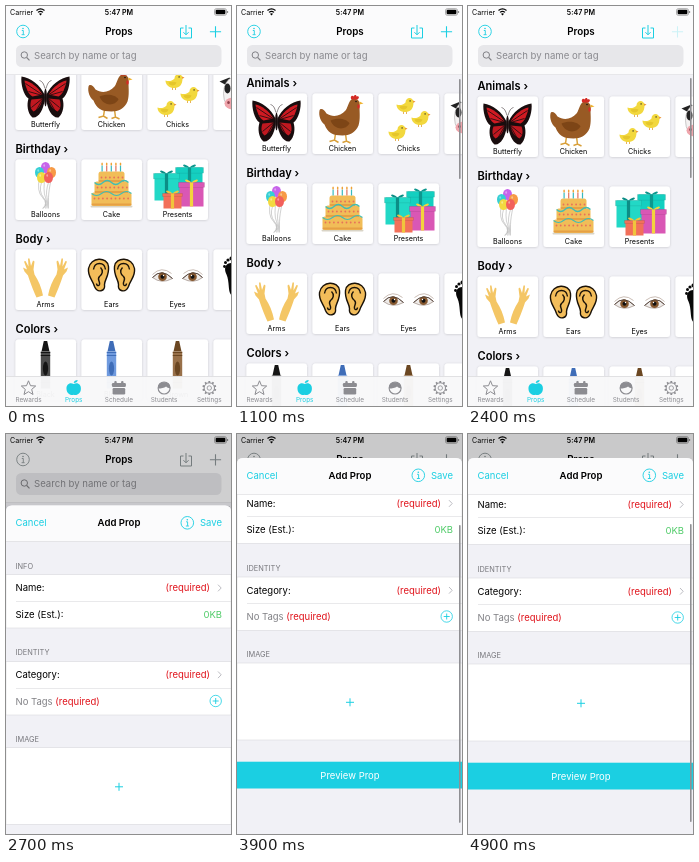
Animation, 225 px wide and 400 px high, one loop 5 s. Source, as an HTML page:

```html
<!DOCTYPE html>
<html lang="en">
<head>
<meta charset="utf-8">
<title>Props</title>
<style>
html, body { margin: 0; width: 100%; height: 100%; overflow: hidden; background: #f1f1f6; }
svg { display: block; width: 100%; height: 100%; }
text { font-family: Inter, Roboto, sans-serif; }
</style>
</head>
<body>
<svg id="stage" viewBox="0 0 225 400"></svg>
<script>
const TEAL = '#1bcfe2', RED = '#e0141c', GRAY = '#8c8c91';

const text = (x, y, size, str, more = '') =>
  `<text x="${x}" y="${y + size * 0.36}" font-size="${size}" ${more}>${str}</text>`;
const mid = (x, y, size, str, more = '') => text(x, y, size, str, 'text-anchor="middle" ' + more);
const rect = (x, y, w, h, fill, more = '') =>
  `<rect x="${x}" y="${y}" width="${w}" height="${h}" fill="${fill}" ${more}/>`;
const oval = (x, y, rx, ry, fill, more = '') =>
  `<ellipse cx="${x}" cy="${y}" rx="${rx}" ry="${ry}" fill="${fill}" ${more}/>`;
const shape = (d, fill, more = '') => `<path d="${d}" fill="${fill}" ${more}/>`;
const line = (d, color, width = 1, more = '') =>
  `<path d="${d}" fill="none" stroke="${color}" stroke-width="${width}" ${more}/>`;
const at = (x, y, art) => `<g transform="translate(${x} ${y})">${art}</g>`;
const flip = art => `<g transform="translate(60 0) scale(-1 1)">${art}</g>`;
const plus = (r, w = 1) => line(`M${-r} 0H${r}M0 ${-r}V${r}`, 'currentColor', w);
const info = oval(0, 0, 6.3, 6.3, 'none', 'stroke="currentColor" stroke-width=".9"') +
  line('M-1.2 -1H.3V3M-1.4 3.2H1.6', 'currentColor', .9) + oval(0, -3, .8, .8, 'currentColor');

// Card pictures, in a 60 x 60 box
function butterfly() {
  const wing = shape('M29 25C25 16 15 8 6 7C5 14 8 26 13 29C11 35 12 44 17 48C23 49 28 40 29 31Z', '#190d0e') +
    shape('M27 25C22 17 15 12 9 11C10 18 13 25 17 27Z', '#cf1a22') +
    shape('M27 29L16 30C14 35 15 40 18 42C23 40 26 35 27 29Z', '#c01820') +
    line('M28 26L10 14M27 26L13 22M27 29L16 38M27 30L20 42', '#190d0e', .8) + line('M29.5 19C28 14 27 12 24 11', '#190d0e', .5);
  return wing + flip(wing) + oval(30, 28, 1.4, 9, '#190d0e');
}
function chicken() {
  return line('M23 40L22 47M33 40L34 48M17 48L22 46.5L26 49M30 49L34 47.5L38 49.5', '#d9a03a', 1.5) +
    shape('M7 17C8 14 12 16 14 20C20 24 28 23 33 17C36 13 36 6 41 5C46 5 48 9 47 13C47 18 48 26 46 32C43 39 37 42 30 42C20 42 15 39 12 31C8 28 6 22 7 17Z', '#985a24') +
    shape('M18 27C25 24 34 25 37 30C33 37 22 37 18 27Z', '#7d4516') +
    shape('M39 6C37 3 40 1 41 3C42 1 44 1 44 3C47 2 47 5 45 6Z', '#d42a24') +
    shape('M47 8L51 10L47 11Z', '#efb22f') + oval(46, 13, 1.2, 2.2, '#d42a24') + oval(43.5, 8, .8, .8, '#111');
}
function chicks() {
  const chick = line('M-2 5V8.5M1 5V8.5', '#e0a030', .8) +
    shape('M-9 -1C-6 0 -3 0 0 -3C0 -9 8 -9 8 -3C8 3 5 7 -1 6.5C-6 6 -9 3 -9 -1Z', '#f2d83e') +
    shape('M-6 1C-3 0 0 0 2 1C1 5 -5 5 -6 1Z', '#e5c62c') + shape('M7.6 -5L10 -3.7L7.6 -2.7Z', '#ec8a20') + oval(4.6, -4.6, .7, .7, '#222');
  return at(27, 12, chick) + at(42, 25, chick) + at(19, 39, chick);
}
function cow() {
  return shape('M6 12L16 8L20 14L17 18Z', '#222') + oval(20, 24, 10, 16, '#f4f1f1', 'stroke="#999" stroke-width=".5"') +
    oval(14, 19, 3, 5, '#222') + oval(20, 34, 9, 6, '#efa5ac') + oval(15, 33, 1.3, 1.6, '#8f3f4a');
}
function balloons() {
  const list = [[30, 8, '#c763ea'], [24, 13, '#35cfd4'], [36, 13, '#f79a45'], [26, 18, '#f2d940'], [33, 18, '#f2605c']];
  return list.map(([x, y]) => line(`M${x} ${y + 5}Q${x - 3} 32 ${(x + 30) / 2} 38T${(x + 30) / 2} 49`, '#888', .4)).join('') +
    list.map(([x, y, c]) => oval(x, y, 4.5, 5.6, c) + oval(x - 1.3, y - 2, .9, 1.3, '#fff', 'opacity=".4"')).join('');
}
function cake() {
  let s = rect(9, 46, 42, 2, '#d9d4c6', 'rx="1"');
  const tiers = [[10, 33, 40, 13.5], [13, 22, 34, 12], [17, 12, 26, 11]];
  for (const [x, y, w, h] of tiers) {
    s += rect(x, y, w, h, '#f1bd58', 'rx="2.5"') + rect(x, y + h - 2.5, w, 2, '#e6a044', 'rx="1"');
    for (let i = x + 3; i < x + w - 1; i += 4.2) s += oval(i, y + 6, .9, .9, '#e8705a');
  }
  for (let i = 0; i < 5; i++) s += rect(20 + i * 4.6, 6, 1.2, 6, i % 2 ? '#e0705e' : '#37b9bd') + oval(20.6 + i * 4.6, 4.5, .8, 1.5, '#f0a032');
  return s + line('M13 23Q17.2 27 21.5 23T30 23T38.5 23T47 23M10 34Q15 38 20 34T30 34T40 34T50 34', '#43bdb2', 1.2);
}
function gift(x, y, w, h, box, band) {
  const c = x + w / 2;
  return rect(x, y, w, h, box) + rect(x - 1, y, w + 2, h * .2, box, 'stroke="#0002" stroke-width=".6"') + rect(c - 1.6, y, 3.2, h, band) +
    shape(`M${c} ${y}C${c - 9} ${y + 1} ${c - 8} ${y - 7} ${c} ${y}C${c + 8} ${y - 7} ${c + 9} ${y + 1} ${c} ${y}Z`, band);
}
const presents = () => gift(29, 8, 26, 28, '#14cfc0', '#0d978e') + gift(7, 14, 24, 27, '#22d8c6', '#0c8e86') +
  gift(32, 23, 24, 24, '#d957b5', '#f3d43d') + gift(16, 34, 18, 15, '#f2705a', '#f0c53c');
function arms() {
  const arm = shape('M21 48C17 39 14 31 12.5 26L9 22L7.5 18L11.5 20L8.5 12L10 11.5L13 17L12.5 9L14 9L15.5 16.5L17.5 11L19 12L18 20L19 25C23 31 26 38 27.5 46Z', '#f4c665');
  return arm + flip(arm);
}
function ears() {
  const ear = shape('M27 17C26 7 9 7 7 19C6 27 11 30 13 37C16 44 24 42 23 35C23 30 28 26 27 17Z', '#f3bd5a', 'stroke="#1a1208" stroke-width="1.4"') +
    line('M24 20C23 12 13 12 12 20M19 18C22 21 21 25 18 27C15 30 19 32 18 35C17 37 15 36 15 34', '#1a1208', 1.4);
  return ear + flip(ear);
}
function eyes() {
  const eye = shape('M5 28Q14 18 25 29Q14 35 5 28Z', '#eeebe9', 'stroke="#8d7a70" stroke-width=".6"') +
    oval(15, 27.2, 4.3, 4.3, '#86582f') + oval(15, 27.2, 2, 2, '#111') + oval(16, 26, .7, .7, '#fff') +
    line('M5 28Q14 18 25 29', '#4b3a31', .9) + line('M5 25Q14 16 24 24', '#a79084', .6);
  return eye + flip(eye);
}
const foot = () => shape('M13 25C9 17 14 12 21 14V47C13 46 17 34 13 25Z', '#080808') +
  [[11, 17, 1.4], [12, 13, 1.5], [14.5, 10.5, 1.6], [18, 9, 2]].map(([x, y, r]) => oval(x, y, r, r, '#080808')).join('');
const crayon = (dark, light) => shape('M28.3 1.5H31.7L34 12H26Z', dark) + rect(25.3, 12, 9.4, 37, light) +
  line('M25.3 13H34.7M25.3 16H34.7M25.3 43H34.7', dark, 1.2) + oval(30, 29, 2.6, 7, dark);

const sections = [
  ['Animals', [['Butterfly', butterfly()], ['Chicken', chicken()], ['Chicks', chicks()], ['Cow', cow()]]],
  ['Birthday', [['Balloons', balloons()], ['Cake', cake()], ['Presents', presents()]]],
  ['Body', [['Arms', arms()], ['Ears', ears()], ['Eyes', eyes()], ['Foot', foot()]]],
  ['Colors', [['Black', crayon('#151515', '#4c4c4c')], ['Blue', crayon('#3f6db8', '#6f9ade')],
    ['Brown', crayon('#6b4722', '#987049')], ['Gray', crayon('#777', '#aaa')]]]
];
const list = sections.map(([name, cards], row) => at(0, row * 90,
  text(9.5, 0, 11.1, name + ' ›', 'font-weight="600"') +
  cards.map(([label, art], i) => at(9.5 + i * 66, 10.5,
    rect(0, 0, 60.5, 60.5, '#fff', 'rx="3" filter="url(#soft)"') + art + mid(30, 55.3, 7.2, label))).join(''))).join('');

const statusBar = text(4, 6, 7.1, 'Carrier') +
  line('M30.5 4.5Q34.5 1.2 38.5 4.5M32 6.4Q34.5 4.3 37 6.4', '#000', 1.2) + shape('M33 7.8Q34.5 6.6 36 7.8L34.5 9.5Z', '#000') +
  mid(113, 6, 7.1, '5:47 PM', 'font-weight="600"') +
  rect(208.5, 2.7, 12, 6.6, 'none', 'rx="1.8" stroke="#777" stroke-width=".6"') + rect(209.6, 3.8, 9.8, 4.4, '#000', 'rx="1"') + rect(221.2, 5, .9, 2, '#777');

const header = rect(0, 0, 225, 69, '#fbfbfc') + rect(0, 68.5, 225, .5, '#d2d2d6') + statusBar +
  mid(113, 25.3, 9.8, 'Props', 'font-weight="600"') +
  `<g id="tint">${at(17, 25.5, info)}${at(180, 26, line('M-2.5 -4H-5.5V6H5.5V-4H2.5M0 -7V2.6M-2.6 .2L0 2.8L2.6 .2', 'currentColor', 1))}
    <g id="add">${at(209.5, 25.8, plus(5.6, 1.1))}</g></g>` +
  rect(10, 39, 205.5, 22, '#e7e7ea', 'rx="5.5"') + oval(18.3, 49, 3.2, 3.2, 'none', 'stroke="#808085"') + line('M20.7 51.5L23.5 54.3', '#808085', 1.1) +
  text(28, 50, 9.6, 'Search by name or tag', 'fill="#8a8a8f"');

const gear = () => {
  let teeth = '';
  for (let i = 0; i < 10; i++) teeth += `<path d="M0 -5.2V-7" transform="rotate(${i * 36})" stroke="${GRAY}" stroke-width="1.8"/>`;
  return teeth + oval(0, 0, 5.2, 5.2, 'none', `stroke="${GRAY}"`) + oval(0, 0, 2.2, 2.2, 'none', `stroke="${GRAY}" stroke-width=".8"`);
};
const tabs = [
  ['Rewards', line('M0 -7.2L2 -2.3L7.2 -2L3.2 1.4L4.5 6.5L0 3.7L-4.5 6.5L-3.2 1.4L-7.2 -2L-2 -2.3Z', GRAY, 1)],
  ['Props', shape('M0 -4C4 -6 7.5 -3.5 7.2 1C7 5 3.5 8 0 6.8C-3.5 8 -7 5 -7.2 1C-7.5 -3.5 -4 -6 0 -4ZM0 -5C0 -7 2 -8 4 -8C4 -6 2 -5 0 -5Z', TEAL)],
  ['Schedule', rect(-7, -5, 14, 4, GRAY, 'rx="1.2"') + rect(-6.3, 0, 12.6, 6.5, GRAY, 'rx="1.2"') + rect(-4.6, -7, 2.4, 4, GRAY, 'rx="1"') + rect(2.2, -7, 2.4, 4, GRAY, 'rx="1"')],
  ['Students', oval(0, 0, 6, 6, 'none', `stroke="${GRAY}" stroke-width="1.1"`) + shape('M-6 .5C-7 -8 7 -8 6 .5C4 0 3 -.5 2 -1.5C0 0 -3 .5 -6 .5Z', GRAY)],
  ['Settings', gear()]
];
const tabBar = rect(0, 370, 225, 30, '#f8f8f9', 'opacity=".97"') + rect(0, 370, 225, .5, '#c8c8cc') +
  tabs.map(([label, icon], i) => at(22.5 + i * 45.2, 382, icon + mid(0, 12, 6.4, label, `fill="${i == 1 ? TEAL : GRAY}"`))).join('');

// Add form
const chevron = y => line(`M212 ${y - 3.3}L215.2 ${y}L212 ${y + 3.3}`, '#bcbcc2', 1);
const group = (y, h) => rect(0, y, 225, h, '#fff', 'stroke="#d2d2d7" stroke-width=".5"');
const right = (y, str, color) => text(216 - (color == RED ? 12 : 0), y, 9.5, str, `text-anchor="end" fill="${color}"`);
const caption = (y, str) => text(9.5, y, 7.4, str, 'fill="#78787d"');
const divider = y => rect(10, y, 215, .5, '#d2d2d7');
const form = caption(69, 'INFO') + group(77, 53.5) + divider(103.5) +
  text(9.5, 90.5, 9.5, 'Name:') + right(90.5, '(required)', RED) + chevron(90.5) +
  text(9.5, 117, 9.5, 'Size (Est.):') + right(117, '0KB', '#4fcb68') +
  caption(155, 'IDENTITY') + group(164, 53.5) + divider(190.5) +
  text(9.5, 177.3, 9.5, 'Category:') + right(177.3, '(required)', RED) + chevron(177.3) +
  text(9.5, 203.7, 9.5, `No Tags <tspan fill="${RED}">(required)</tspan>`, 'fill="#808085"') +
  at(209.7, 203.5, oval(0, 0, 5.7, 5.7, 'none', 'stroke="currentColor" stroke-width=".8"') + plus(3, .9)) +
  caption(241.7, 'IMAGE') + group(250, 77) + at(113, 289.3, plus(4, 1)) +
  rect(0, 348.7, 225, 26.8, TEAL) + mid(113, 362.3, 9.5, 'Preview Prop', 'fill="#fff"');
const sheet = shape('M0 440V30Q0 24 6 24H219Q225 24 225 30V440Z', '#f1f1f6') +
  `<g id="form" color="${TEAL}"></g>` +
  shape('M0 60V30Q0 24 6 24H219Q225 24 225 30V60Z', '#fbfbfc') + rect(0, 60, 225, .5, '#d0d0d5') +
  text(9.5, 41.3, 9.5, 'Cancel', `fill="${TEAL}"`) + mid(113, 41.3, 9.6, 'Add Prop', 'font-weight="600"') +
  `<g color="${TEAL}">${at(181.3, 41.3, info)}</g>` + text(194, 41.3, 9.5, 'Save', `fill="${TEAL}"`) +
  rect(222, 60, 1.6, 298, '#8f8f93', 'rx=".8" id="formBar"');

const $ = id => document.getElementById(id);
$('stage').innerHTML = `<defs><filter id="soft" x="-20%" y="-20%" width="140%" height="140%">
  <feDropShadow dx="0" dy=".4" stdDeviation="1" flood-opacity=".18"/></filter></defs>` +
  rect(0, 0, 225, 400, '#f1f1f6') + `<g id="list">${list}</g>` + rect(222, 72, 1.6, 100, '#8f8f93', 'rx=".8" id="listBar"') +
  header + tabBar + rect(0, 0, 225, 400, '#000', 'id="dim"') + `<g id="sheet">${sheet}</g>`;
$('form').innerHTML = form;

const clamp = v => Math.min(1, Math.max(0, v));
const easeOut = v => 1 - (1 - clamp(v)) ** 3;
function track(t, keys) {
  const i = keys.findIndex(k => k[0] >= t);
  if (i < 1) return i ? keys[keys.length - 1][1] : keys[0][1];
  const [t0, a] = keys[i - 1], [t1, b] = keys[i];
  return a + (b - a) * (t - t0) / (t1 - t0);
}
const move = (id, y) => $(id).setAttribute('transform', `translate(0 ${y})`);
const set = (id, name, value) => $(id).setAttribute(name, value);

function draw(now) {
  const t = Math.floor(now % 5000 / 100) * 100;

  // The list is dragged past its top, then springs back to 80
  const y = t <= 1800 ? track(t, [[0, 53], [1100, 77], [1800, 92]]) : 92 - 12 * easeOut((t - 1800) / 600);
  move('list', y);
  set('listBar', 'y', 72 + Math.max(0, 80 - y) * .32);
  set('listBar', 'height', 100 - Math.max(0, y - 80));
  set('listBar', 'opacity', clamp(t / 200));

  const rise = easeOut((t - 2400) / 600);
  move('sheet', 380 * (1 - rise));
  set('sheet', 'visibility', rise ? 'visible' : 'hidden');
  set('dim', 'opacity', .2 * rise);
  set('tint', 'color', rise ? '#8e9799' : TEAL);
  set('add', 'opacity', t == 2400 ? .2 : 1);

  const scroll = track(t, [[3000, 16], [3200, 0], [3500, -17], [3900, -21], [4900, -20]]);
  move('form', scroll);
  set('formBar', 'y', 72 - scroll * .9);
  set('formBar', 'opacity', clamp((t - 2900) / 200));
}
const start = performance.now();
function tick() {
  draw(performance.now() - start);
  requestAnimationFrame(tick);
}
tick();
</script>
</body>
</html>
```
